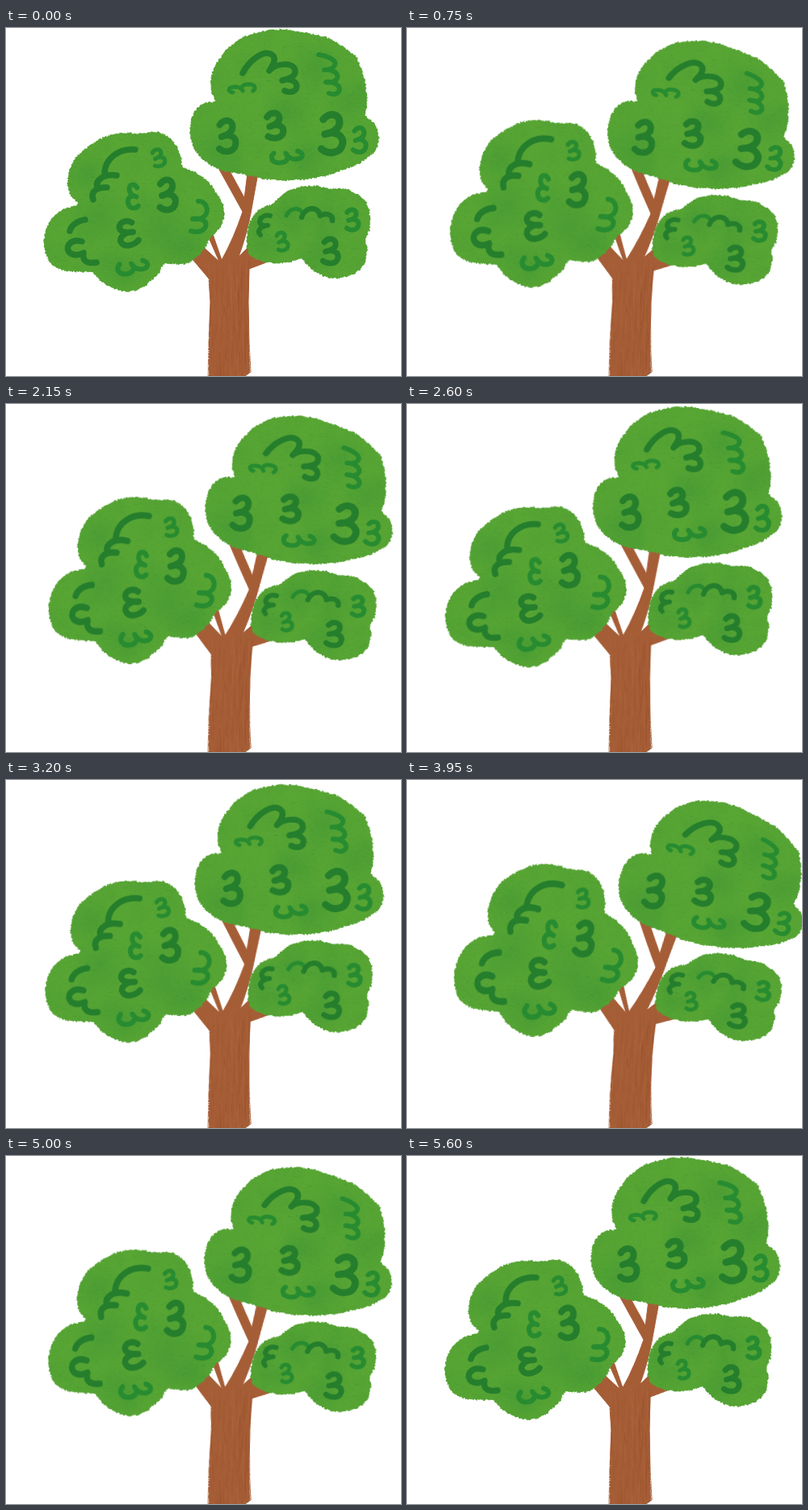
Animation, 489 px wide and 432 px high, one loop 5650 ms. Source, as an HTML page with a canvas:

```html
<!DOCTYPE html>
<html lang="en">
<head>
<meta charset="utf-8">
<title>Swaying tree</title>
<style>
html, body { margin: 0; width: 100%; height: 100%; overflow: hidden; background: #fff }
canvas { display: block }
</style>
</head>
<body>
<canvas id="stage" width="489" height="432"></canvas>
<script>
const W = 489, H = 432, LOOP = 5650, STEP = 50;
const stage = document.getElementById('stage').getContext('2d');
const tree = document.createElement('canvas');
tree.width = W; tree.height = H;
const g = tree.getContext('2d');

let seed = 11;
const rnd = () => (seed = seed * 16807 % 2147483647) / 2147483647;
const spread = n => (rnd() - .5) * 2 * n;

// Closed Catmull-Rom outline with a rough crayon edge
function rough(pts, amount) {
  const path = new Path2D(), n = pts.length / 2;
  const at = (i, a) => pts[(i + n) % n * 2 + a];
  for (let i = 0; i < n; i++) {
    const len = Math.ceil(Math.hypot(at(i + 1, 0) - at(i, 0), at(i + 1, 1) - at(i, 1)));
    for (let s = 0; s < len; s++) {
      const t = s / len;
      const [x, y] = [0, 1].map(a => {
        const p = at(i - 1, a), q = at(i, a), r = at(i + 1, a), v = at(i + 2, a);
        return q + .5 * t * (r - p + t * (2 * p - 5 * q + 4 * r - v + t * (3 * q - p - 3 * r + v)));
      });
      path.lineTo(x + spread(amount), y + spread(amount));
    }
  }
  path.closePath();
  return path;
}

function patch(x, y, r, rgb, alpha) {
  const soft = g.createRadialGradient(x, y, 0, x, y, r);
  soft.addColorStop(0, `rgba(${rgb},${alpha})`);
  soft.addColorStop(1, `rgba(${rgb},0)`);
  g.fillStyle = soft;
  g.fillRect(x - r, y - r, 2 * r, 2 * r);
}

const TONES = ['#227d2c', '#258b30'];
const BUMPS = new Path2D('M-.45-.36C-.2-.58 .36-.54 .3-.25C.25-.1-.1 0-.34.03C.1-.1 .56.04 .49.27C.4.55-.2.55-.47.42');

function mark(path, tone, width) {
  g.strokeStyle = TONES[tone];
  g.lineWidth = width;
  g.stroke(path);
}

// threes: [x, y, width, height, angle, tone, line]; strokes: [path, tone, line]
function crown({ outline, box: [x, y, w, h], shade, threes, strokes }) {
  const edge = rough(outline, 1.1);
  g.save();
  g.fillStyle = '#56a433';
  g.fill(edge);
  g.clip(edge);
  for (const [px, py, r] of shade) patch(px, py, r, '48,140,52', .3);
  for (let i = 0; i < 45; i++)
    patch(x + rnd() * w, y + rnd() * h, 8 + rnd() * 18, i % 2 ? '52,142,50' : '98,174,56', .1);
  for (let i = 0; i < w * h / 14; i++) {
    g.fillStyle = i % 2 ? 'rgba(40,125,45,.1)' : 'rgba(120,185,70,.1)';
    g.fillRect(x + rnd() * w, y + rnd() * h, 1 + rnd() * 3, 1);
  }
  g.globalAlpha = .95;
  g.lineCap = g.lineJoin = 'round';
  for (const [mx, my, mw, mh, angle, tone, line] of threes) {
    const p = new Path2D();
    p.addPath(BUMPS, new DOMMatrix().translate(mx, my).rotate(angle).scale(mw, mh));
    mark(p, tone, line);
  }
  for (const [d, tone, line] of strokes) mark(new Path2D(d), tone, line);
  g.restore();
}

function trunk() {
  const wood = new Path2D();
  const parts = [
    'M250 432L251 390L253 340L251 311L230 286L240 268L264 290L250 258L256 256L267 288Q282 261 293 228L299 180L312 180L303 230Q297 260 288 284L304 268L318 284L302 289L311 287L330 284L322 291L301 299L300 340L301 390L303 427L296 432Z',
    'M262 172L275 174L298 216L293 228Z'
  ];
  parts.forEach(d => wood.addPath(new Path2D(d)));
  g.save();
  g.fillStyle = g.strokeStyle = '#a55d36';
  g.lineWidth = 1;
  g.fill(wood);
  g.stroke(wood);
  g.clip(wood);
  for (let i = 0; i < 190; i++) {
    const x = 248 + rnd() * 56, y = 285 + rnd() * 145;
    g.strokeStyle = i % 3 ? 'rgba(138,70,36,.2)' : 'rgba(190,115,72,.2)';
    g.beginPath();
    g.moveTo(x, y);
    g.lineTo(x + spread(1.5), y + 8 + rnd() * 35);
    g.stroke();
  }
  g.restore();
  g.fillStyle = '#fff';
  for (let y = 312; y < H; y += 2) {
    g.fillRect(248, y, 2 + rnd() * 1.6, 1);
    g.fillRect(302 - rnd(), y, 1, 1);
  }
}

const crowns = [{
  outline: [258,88, 254,76, 255,58, 262,42, 275,25, 295,11, 318,4, 342,2, 372,6, 400,13, 420,25, 434,37,
    441,55, 446,75, 447,95, 445,108, 455,118, 461,132, 461,143, 454,156, 437,168, 412,178, 385,186, 350,189,
    325,188, 305,184, 290,181, 268,177, 250,168, 238,157, 230,142, 228,128, 230,112, 237,99, 247,93, 257,91],
  box: [226, 0, 238, 192],
  shade: [[262, 150, 42], [385, 48, 34], [425, 95, 34], [350, 105, 34], [375, 160, 38]],
  threes: [
    [274, 134, 21, 38, 0, 0, 8], [333, 121, 20, 31, -4, 0, 8], [404, 131, 27, 47, 3, 0, 9],
    [438, 139, 16, 30, 3, 1, 6], [348, 160, 13, 38, 84, 1, 6], [292, 75, 9, 32, -95, 1, 5]
  ],
  strokes: [
    ['M293 56C302 39 319 27 329 33C336 38 330 47 326 53C334 43 357 42 358 53C359 60 351 63 342 65C353 61 363 68 359 76C356 80 350 80 345 78', 0, 7.5],
    ['M387 33C399 35 410 40 407 46C405 51 399 52 394 52C405 50 414 58 409 64C405 68 400 68 396 67C406 66 416 72 412 79C409 83 405 83 400 81', 1, 6]
  ]
}, {
  outline: [89,218, 80,208, 76,192, 80,172, 90,157, 105,145, 122,135, 145,130, 165,131, 185,129, 200,135,
    212,148, 217,163, 219,172, 235,180, 250,190, 260,204, 266,213, 270,223, 270,235, 265,248, 252,262,
    247,272, 235,286, 220,293, 197,293, 190,303, 178,315, 168,323, 152,327, 135,324, 118,315, 107,304,
    90,303, 72,301, 57,294, 49,280, 47,265, 50,248, 58,235, 68,226, 80,222],
  box: [44, 127, 230, 202],
  shade: [[195, 250, 48], [225, 270, 36], [115, 235, 40], [100, 180, 30], [140, 300, 34]],
  threes: [
    [189, 161, 14, 21, -12, 1, 5], [157, 209, -13, 29, -3, 1, 6], [200, 207, 20, 37, 0, 0, 8],
    [150, 255, -22, 30, -20, 0, 7.5], [157, 297, 14, 37, 80, 1, 6]
  ],
  strokes: [
    ['M160 151C140 149 122 162 122 181M137 183C122 181 110 188 113 198M125 198C113 197 104 203 108 213', 0, 7.5],
    ['M238 215C248 215 251 226 247 232C243 237 236 238 231 237C240 235 250 239 247 247C244 253 236 254 229 252', 1, 6],
    ['M98 238C88 239 80 246 79 252M94 265C80 261 72 272 79 279C84 283 90 282 96 279C94 289 100 293 112 291', 0, 7.5]
  ]
}, {
  outline: [330,218, 345,205, 362,198, 382,196, 400,199, 420,200, 436,207, 447,218, 451,235, 450,250,
    445,262, 447,275, 444,292, 432,304, 415,310, 400,310, 385,304, 375,296, 365,287, 350,291, 332,292,
    315,289, 302,281, 298,268, 299,250, 304,237, 313,226, 322,221],
  box: [296, 194, 158, 118],
  shade: [[320, 265, 32], [400, 235, 34], [390, 280, 32], [350, 225, 28]],
  threes: [
    [429, 238, 15, 25, 0, 1, 6], [342, 265, 13, 22, -8, 1, 5], [402, 277, 19, 30, 3, 0, 7]
  ],
  strokes: [
    ['M327 233C320 231 314 236 314 241C315 245 320 246 324 245C315 246 310 252 315 257', 0, 6],
    ['M347 233C351 224 361 222 366 228', 1, 5],
    ['M366 235C370 222 386 220 389 233C395 229 405 231 404 239', 0, 6.5]
  ]
}];

trunk();
crowns.forEach(crown);

// Lean right for RISE ms, then back, twice per loop
const RISE = 1450, FALL = 1375, PIVOT = 268, MAX_BEND = .00085;
function bendAt(t) {
  t %= RISE + FALL;
  const phase = t < RISE ? t / RISE : 1 + (t - RISE) / FALL;
  return MAX_BEND * (1 - Math.cos(Math.PI * phase)) / 2;
}

// Wrap the tree along a circular arc, one thin strip at a time
function draw(bend) {
  stage.setTransform(1, 0, 0, 1, 0, 0);
  stage.fillStyle = '#fff';
  stage.fillRect(0, 0, W, H);
  if (bend < 1e-7) return stage.drawImage(tree, 0, 0);
  for (let h = 0; h < H; h += 2) {
    const a = bend * h, y = H - h, top = Math.max(0, y - 3);
    stage.setTransform(1, 0, 0, 1, PIVOT + (1 - Math.cos(a)) / bend, H - Math.sin(a) / bend);
    stage.rotate(a);
    stage.drawImage(tree, 0, top, W, y - top, -PIVOT, top - y, W, y - top);
  }
}

const start = performance.now();
function frame() {
  const t = (performance.now() - start) % LOOP;
  draw(bendAt(Math.floor(t / STEP) * STEP));
  requestAnimationFrame(frame);
}
frame();
</script>
</body>
</html>
```
